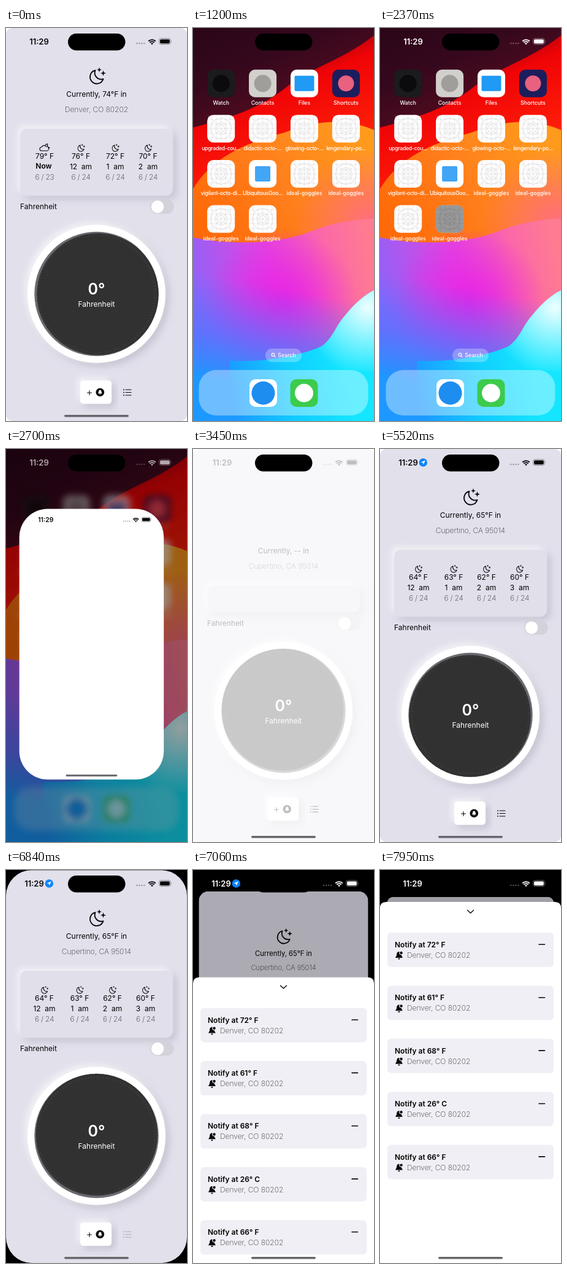
An HTML page that plays this animation: 295x640 px, repeating every 8000 ms.

```html
<!DOCTYPE html>
<html lang="en">
<head>
<meta charset="utf-8">
<title>Weather app</title>
<style>
html, body { margin: 0; width: 100%; height: 100%; overflow: hidden; background: #000; }
svg { display: block; width: 100%; height: 100%; }
text { font-family: Inter, "Open Sans", sans-serif; font-size: 12px; white-space: pre; }
.mid { text-anchor: middle; }
.thin { font-weight: 200; fill: #333; }
.bold { font-weight: 600; }
.label { font-size: 8.8px; font-weight: 500; fill: #fff; text-anchor: middle; }
.tight { letter-spacing: -.35px; }
.line { fill: none; stroke: currentColor; stroke-linecap: round; stroke-linejoin: round; }
</style>
</head>
<body>
<svg id="stage" viewBox="0 0 295 640"></svg>
<script>
const LOOP = 8000;
const INK = '#08080a';
const $ = id => document.getElementById(id);
const lerp = (a, b, k) => a + (b - a) * k;
const ramp = (t, a, b) => Math.min(1, Math.max(0, (t - a) / (b - a)));
const spring = (t, start, w) => {
  const x = Math.max(0, t - start) / 1000 * w;
  return 1 - (1 + x) * Math.exp(-x);
};

const text = (x, y, s, cls = '', more = '') => `<text x="${x}" y="${y}" class="${cls}" ${more}>${s}</text>`;
const rect = (x, y, w, h, r, fill, more = '') =>
  `<rect x="${x}" y="${y}" width="${w}" height="${h}" rx="${r}" fill="${fill}" ${more}/>`;
const circle = (x, y, r, fill, more = '') => `<circle cx="${x}" cy="${y}" r="${r}" fill="${fill}" ${more}/>`;
const path = (d, fill, more = '') => `<path d="${d}" fill="${fill}" ${more}/>`;
const group = (id, body, more = '') => `<g id="${id}" ${more}>${body}</g>`;
const at = (x, y, body, s = 1) => `<g transform="translate(${x} ${y}) scale(${s})">${body}</g>`;
const gradient = (id, coords, ...stops) => `<linearGradient id="${id}" gradientUnits="userSpaceOnUse" ${coords}>` +
  stops.map(([o, c]) => `<stop offset="${o}" stop-color="${c}"/>`).join('') + '</linearGradient>';
const glow = (id, x, y, r, c) => `<radialGradient id="${id}" gradientUnits="userSpaceOnUse" cx="${x}" cy="${y}" r="${r}">` +
  `<stop offset="0" stop-color="${c}"/><stop offset="1" stop-color="${c}" stop-opacity="0"/></radialGradient>`;

// Icons
const spark = (x, y, r) => {
  const k = r * .25;
  return path(`M${x} ${y - r}L${x + k} ${y - k}L${x + r} ${y}L${x + k} ${y + k}L${x} ${y + r}L${x - k} ${y + k}L${x - r} ${y}L${x - k} ${y - k}Z`, 'currentColor');
};
const moon = (w = 1.9) =>
  `<path class="line" stroke-width="${w}" d="M-2-9A11 11 0 1 0 11 5A10.5 10.5 0 0 1-2-9Z"/>` +
  spark(4.5, -10, 4) + spark(11, -4.5, 4.5);
const cloudMoon =
  '<path class="line" stroke-width="1.1" d="M-5 5A3 3 0 0 1-5-1A4 4 0 0 1 2-2A3.4 3.4 0 0 1 4 5ZM1-4A3.6 3.6 0 0 1 5-6A4 4 0 0 0 8 0A4 4 0 0 1 6 1"/>';
const bell = 'M0-5.6C-3-5.6-3.6-3-3.7-.5C-3.8 1.4-5.6 2.4-5.6 3.7H5.6C5.6 2.4 3.8 1.4 3.7-.5C3.6-3 3-5.6 0-5.6ZM-1.7 4.6H1.7Q1.3 6.4 0 6.4T-1.7 4.6Z';
const listIcon = [-4.5, 0, 4.5].map(y =>
  circle(-6, y, .9, 'currentColor') + `<path class="line" stroke-width="1.2" d="M-3 ${y}H6"/>`).join('');

const status = timeId => text(54, 27, '11:29', 'bold mid', `id="${timeId}" fill="currentColor" style="font-size:13px"`) +
  [0, 1, 2, 3].map(i => circle(213.3 + i * 4, 25, 1.3, 'currentColor', 'opacity=".3"')).join('') +
  at(238, 26.5, '<path class="line" stroke-width="1.9" style="stroke-linecap:butt" d="M-5.8-5A8.2 8.2 0 0 1 5.8-5M-3.7-2.8A5.3 5.3 0 0 1 3.7-2.8"/>' +
    path('M0 .8L-2-1.2A2.9 2.9 0 0 1 2-1.2Z', 'currentColor')) +
  rect(249.6, 17, 18.6, 9.6, 3, 'none', 'stroke="currentColor" stroke-opacity=".4"') +
  rect(251, 18.4, 15.8, 6.8, 1.8, 'currentColor') +
  path('M269.3 20.2Q270.8 21.8 269.3 23.4Z', 'currentColor', 'opacity=".5"');

// Home screen
const tileGrid = [-15, -7.5, 0, 7.5, 15].map(v => `M${v}-22V22M-22 ${v}H22`).join('') + 'M-22-22L22 22M22-22L-22 22';
const gridMark = `<g fill="none" stroke="#bcbcc2" stroke-width=".45"><path d="${tileGrid}" opacity=".6"/>` +
  [6, 10, 17].map(r => `<circle r="${r}"/>`).join('') + '</g>';
const tile = (x, y, fill, mark = '') => at(x, y, rect(-22.5, -22.5, 45, 45, 10, fill) + mark);
const dot = (fill, r = 14) => circle(0, 0, r, fill);
const box = (fill, w, h = w) => rect(-w / 2, -h / 2, w, h, 2, fill);
const blank = ['#fff', gridMark];
const apps = [
  ['Watch', '#1b1b1e', dot('#0b0b0d')], ['Contacts', '#d2d0cc', dot('#a09e9a')],
  ['Files', '#fff', box('#1f9bf5', 32, 25)], ['Shortcuts', '#1c1d5c', dot('#e8617f', 13)],
  ['upgraded-cou...', ...blank], ['didactic-octo-...', ...blank],
  ['glowing-octo-...', ...blank], ['lengendary-po...', ...blank],
  ['vigilant-octo-di...', ...blank], ['UbiquitousGoo...', '#fff', box('#42a5f5', 25)],
  ['ideal-goggles', ...blank], ['ideal-goggles', ...blank],
  ['ideal-goggles', ...blank], ['ideal-goggles', ...blank]
];
const icons = apps.map(([name, fill, mark], i) => {
  const x = 45.7 + (i % 4) * 67.9, y = 90.3 + (i >> 2) * 73.6;
  return tile(x, y, fill, mark) + text(x, y + 34.7, name, name.endsWith('...') ? 'label tight' : 'label');
}).join('');
const wallpaper =
  rect(0, 0, 295, 640, 0, 'url(#dark)') +
  path('M0 162C60 147 110 130 150 98C195 62 245 52 295 12V300H0Z', 'url(#red)') +
  path('M0 262C35 205 95 185 150 170C205 148 255 148 295 166V420H0Z', 'url(#orange)') +
  rect(150, 180, 145, 250, 0, 'url(#rose)') +
  path('M0 341C60 354 140 352 190 332C225 318 260 312 295 310V640H0Z', 'url(#violet)') +
  rect(0, 330, 295, 310, 0, 'url(#magenta)') + rect(0, 400, 295, 240, 0, 'url(#blue)') +
  path('M60 542C120 545 180 532 210 518C230 503 232 485 248 468C264 448 278 436 295 427V640H60Z', 'url(#cyan)') +
  path('M110 542C160 538 190 530 210 518C230 503 232 485 248 468C264 448 278 436 295 427V560Z', 'url(#shine)');
const dock = rect(9.5, 557, 276, 74, 28, '#fff', 'opacity=".36"') +
  tile(114.5, 594.5, '#fff', dot('#1e8df0', 19)) + tile(181, 594.5, '#3ccb4b', dot('#fff', 15));
const search = rect(118, 522, 59, 22, 11, '#fff', 'opacity=".27"') +
  '<g fill="none" stroke="#fff" stroke-width="1.1"><circle cx="130.5" cy="532" r="2.4"/><path d="M132.3 534L134.3 536"/></g>' +
  text(153, 536, 'Search', 'label');

// Weather screen
const cells = (id, list) => group(id, list.map(([x, temp, hour, day, icon]) =>
  (icon ? at(x, 195, cloudMoon) : at(x, 195, moon(2.2), .47)) +
  text(x, 213, temp + '° F', 'mid') +
  (hour === 'Now' ? text(x - 1.5, 229, hour, 'bold mid') : text(x, 230, hour + '  am', 'mid')) +
  text(x, 247, '6 / ' + day, 'thin mid', 'style="letter-spacing:-.2px"')).join(''));
const dial =
  circle(147.5, 433, 112.5, '#fff', 'filter="url(#soft)"') +
  circle(147.5, 433, 101.2, '#6a6a70') + circle(147.5, 433, 99.2, '#313131', 'id="face"') +
  '<circle cx="147.5" cy="433" r="95.5" fill="none" stroke="#48484a" stroke-width="3" stroke-dasharray="1.6 3.4" opacity=".55"/>' +
  text(147.5, 434, '0°', 'mid', 'style="font-size:25px;font-weight:600;fill:#fff"') +
  text(147.5, 454, 'Fahrenheit', 'mid', 'style="fill:#fff"');
const controls =
  text(23, 295, 'Fahrenheit') + rect(235, 279.5, 38.5, 23, 11.5, '#d3d1d9') + circle(247, 291, 10.3, '#fff') +
  dial + rect(121, 574, 51, 38, 5, '#fff', 'filter="url(#soft)"') +
  '<path class="line" stroke-width="1.1" d="M132.5 594H139.5M136 590.5V597.5"/>' +
  circle(153.3, 593.3, 6.8, INK) + at(153.3, 593, path(bell, '#fff'), .62) +
  group('list', at(198, 593.5, listIcon));
const weather =
  rect(0, 0, 295, 640, 0, '#fff', 'id="under"') + rect(0, 0, 295, 640, 10, '#e2e0eb', 'id="paper"') +
  group('bigMoon', at(147.5, 78, moon())) +
  group('place', text(147.5, 112, '', 'mid', 'id="now"') + text(147.5, 137, '', 'thin mid', 'id="city"')) +
  rect(23, 164, 249, 109, 11, '#e1dfea', 'id="card" filter="url(#soft)"') +
  cells('denver', [[63, 79, 'Now', 23, 1], [122, 76, '12', 24], [178, 72, '1', 24], [231.5, 70, '2', 24]]) +
  cells('cupertino', [[62.5, 64, '12', 24], [120, 63, '1', 24], [173.5, 62, '2', 24], [227.5, 60, '3', 24]]) +
  group('controls', controls) + rect(0, 0, 295, 640, 10, '#000', 'id="dim" opacity="0"');

// Notification sheet
const rows = ['72° F', '61° F', '68° F', '26° C', '66° F'].map((temp, i) => at(0, i * 86.4,
  rect(12, 50, 271, 56, 6, '#f0eff5') + text(24, 74, 'Notify at ' + temp, 'bold') +
  '<path class="line" stroke-width="1.6" d="M259 69.3H268.5"/>' +
  at(31, 87, path(bell, INK, 'transform="scale(1.05)"') + circle(3.6, -4, 3.3, '#f0eff5') + circle(3.6, -4, 2.2, INK)) +
  text(44, 91, 'Denver, CO 80202', 'thin'))).join('');
const sheet = path('M0 10Q0 0 10 0H285Q295 0 295 10V640H0Z', '#fff') +
  '<path class="line" stroke-width="1.4" d="M142.5 13.5L147.5 18.2L152.5 13.5"/>' + rows;

$('stage').innerHTML = '<defs>' +
  gradient('dark', 'x1="0" y1="0" x2="60" y2="140"', [0, '#2a0618'], [.6, '#36081d'], [1, '#4a0a1e']) +
  gradient('red', 'x1="120" y1="55" x2="190" y2="220"', [0, '#a0000e'], [.3, '#f00406'], [1, '#ff2008']) +
  gradient('orange', 'x1="20" y1="330" x2="260" y2="170"', [0, '#ff6a08'], [.5, '#ff7f1c'], [1, '#ff9a1c']) +
  gradient('violet', 'x1="0" y1="440" x2="295" y2="380"', [0, '#9062f8'], [.45, '#e444e0'], [.75, '#fb68a8'], [1, '#ff7c90']) +
  gradient('blue', 'x1="70" y1="410" x2="40" y2="575"', [0, '#4a78ff00'], [.55, '#4a78ffb0'], [1, '#1c98ff']) +
  gradient('cyan', 'x1="60" y1="600" x2="250" y2="560"', [0, '#1c98ff'], [.5, '#10ccff'], [1, '#14e6ff']) +
  glow('rose', 290, 320, 125, '#ff6c80') + glow('magenta', 145, 450, 125, '#e822e6') + glow('shine', 285, 455, 110, '#ecffff') +
  '<filter id="soft" x="-20%" y="-50%" width="140%" height="200%"><feDropShadow dx="-5" dy="-5" stdDeviation="5" flood-color="#fff" flood-opacity=".6"/><feDropShadow dx="6" dy="6" stdDeviation="6" flood-color="#8d8a9c" flood-opacity=".32"/></filter>' +
  '<filter id="blur" filterUnits="userSpaceOnUse" x="-20" y="-20" width="335" height="680"><feGaussianBlur id="blurSize" stdDeviation="0"/></filter>' +
  '<clipPath id="appClip"><rect id="clip" width="295" height="640"/></clipPath></defs>' +
  rect(0, 0, 295, 640, 0, '#000') +
  group('home', wallpaper + group('icons', icons + search + dock) +
    rect(0, 0, 295, 640, 0, '#000', 'id="shade"') + rect(91.1, 288.6, 45, 45, 10, '#000', 'id="press"')) +
  group('app', weather, `clip-path="url(#appClip)" color="${INK}"`) +
  group('sheet', sheet, `color="${INK}"`) +
  group('status', status('time') + group('arrow', circle(0, 0, 6.7, '#0a84ff') + path('M3.6-3.6L.4 3.6L-.4.4L-3.6-.4Z', '#fff'))) +
  group('launch', rect(0, 0, 295, 640, 0, '#fff', 'id="win"') + group('winGrid', at(147.5, 147.5, gridMark, 6.55)) +
    group('winBar', status('winTime') + rect(95, 0, 105, 3.6, 1.8, '#67666b', 'id="winHome"')), `color="${INK}"`) +
  rect(95, 630, 105, 3.6, 1.8, '#67666b', 'id="homeBar"') +
  rect(101, 9, 93.5, 27.5, 13.75, '#000');

const set = (id, attrs) => { for (const k in attrs) $(id).setAttribute(k, attrs[k]); };
const show = (id, on) => set(id, { display: on ? 'inline' : 'none' });

function drawHome(t) {
  const p = t >= 3120 ? 1 : Math.min(1, spring(t, 2400, 9) * 1.012);
  set('icons', {
    transform: `translate(147.5 320) scale(${1 - .04 * p}) translate(-147.5 -320)`,
    filter: p > .01 ? 'url(#blur)' : 'none', opacity: 1 - .45 * p
  });
  set('blurSize', { stdDeviation: 7 * p });
  set('shade', { opacity: .5 * p });
  set('press', { opacity: p > 0 ? 0 : .4 * ramp(t, 2200, 2330) });

  show('launch', t > 2400 && t < 3600);
  const w = lerp(45, 295, p), h = lerp(45, 640, Math.pow(p, 1.5)), s = w / 295;
  const x = lerp(113.6, 147.5, p) - w / 2, y = lerp(311.1, 320, p) - h / 2;
  const round = lerp(10, 46, ramp(p, 0, .6)) * (1 - ramp(p, .9, 1));
  set('launch', { transform: `translate(${x} ${y}) scale(${s})`, opacity: 1 - ramp(t, 3400, 3600) });
  set('win', { height: h / s, rx: round / s });
  set('winGrid', { opacity: 1 - ramp(p, 0, .3) });
  set('winBar', { opacity: t < 3400 ? ramp(p, .2, .6) : 0 });
  set('winHome', { y: h / s - 10 });
}

function drawWeather(t) {
  const first = t < 1200, loaded = first || t >= 4020;
  $('now').textContent = `Currently, ${first ? '74°F' : loaded ? '65°F' : '--'} in`;
  $('city').textContent = first ? 'Denver, CO 80202' : 'Cupertino, CA 95014';
  show('bigMoon', loaded);
  show('denver', first);
  show('cupertino', !first && loaded);
  set('place', { transform: `translate(0 ${loaded ? 0 : 57.5})` });
  set('card', { y: loaded ? 164 : 222, height: loaded ? 109 : 44 });
  set('controls', { transform: `translate(0 ${loaded ? 0 : -6.8})` });
  set('list', { opacity: 1 - .75 * ramp(t, 6720, 6830) });
  const a = (first ? 190 + .12 * t : 90 + .12 * (t - 3780)) * Math.PI / 180;
  set('face', { cx: 147.5 - 2 * Math.cos(a), cy: 433 - 2 * Math.sin(a) });
}

function drawSheet(t) {
  const q = spring(t, 6835, 13), open = t > 6835;
  const round = open ? lerp(42, 10, q) : 0;
  set('app', { transform: `translate(${12 * q} ${44 * q}) scale(${1 - .0814 * q})` });
  set('clip', { rx: round });
  show('under', !open);
  set('paper', { rx: open ? 0 : 10 });
  set('dim', { opacity: .3 * q });
  show('sheet', q > .01);
  set('sheet', { transform: `translate(0 ${lerp(640, 52, q)})` });
  return q;
}

function draw(t) {
  const home = t >= 1200 && t < 3120;
  const inApp = t < 1200 || t >= 3400;
  show('home', home);
  show('app', inApp);
  drawHome(t);
  drawWeather(t);
  const q = drawSheet(t);

  const back = ramp(t, 7600, 7800);
  const pop = ramp(t, 4340, 4520) * (1 - back);
  const timeX = t < 3400 ? 54 : lerp(lerp(47.5, 46, ramp(t, 4340, 4520)), 53, back);
  set('time', { x: timeX });
  set('arrow', { transform: `translate(70.3 22) scale(${pop})`, opacity: pop });
  set('status', {
    color: home || q > .4 ? '#fff' : INK,
    opacity: home ? ramp(t, 1280, 1530) * (1 - .35 * ramp(t, 2400, 2700)) : 1
  });
  show('homeBar', inApp);
}

function frame(now) {
  draw(now % LOOP);
  requestAnimationFrame(frame);
}
draw(0);
requestAnimationFrame(frame);
</script>
</body>
</html>
```
